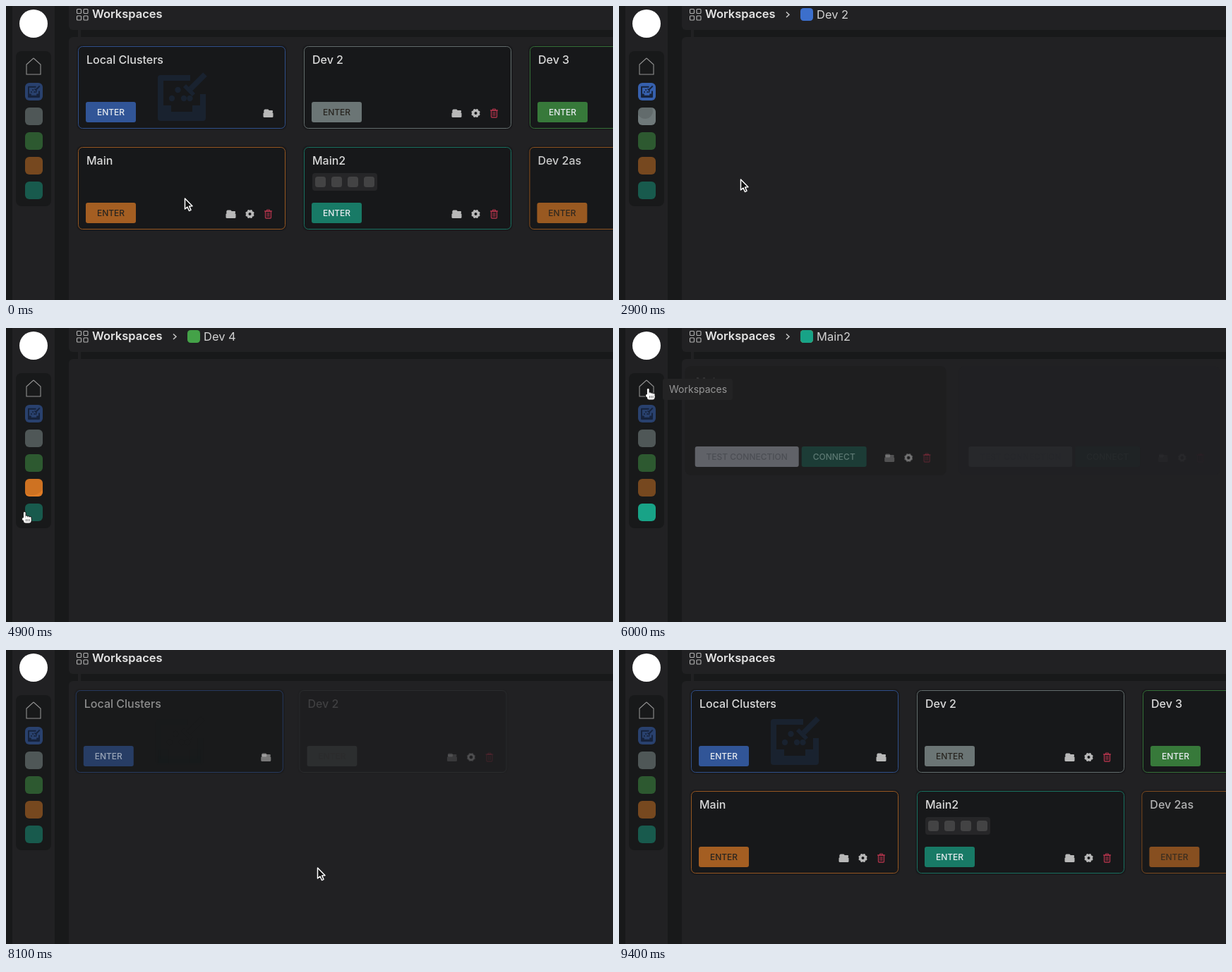
An HTML page with a canvas for the animation above (9500 ms loop, 860 by 417 pixels).

```html
<!DOCTYPE html>
<html lang="en">
<head>
<meta charset="utf-8">
<title>Workspaces</title>
<style>
html, body { margin: 0; width: 100%; height: 100%; overflow: hidden; background: #18191a; }
canvas { display: block; }
</style>
</head>
<body>
<canvas id="stage" width="860" height="417"></canvas>
<script>
const ctx = document.getElementById('stage').getContext('2d');
const LOOP = 9500, STEP = 100, HOME = -1;
const DARK = '#18191a', PAGE = '#212123', GREY = '#b8b8b8', LIGHT = '#dadada';

const hues = { blue: '#3c6fcc', grey: '#8e9c9c', green: '#44a248', orange: '#e07c25', teal: '#18a387' };
const sideHues = Object.values(hues);
const crumbNames = ['Local Clusters', 'Dev 2', 'Dev 3', 'Dev 4', 'Main2'];
const cardNames = ['Local Clusters', 'Dev 2', 'Dev 3', 'Main', 'Main2', 'Dev 2as'];
const cardHues = [...sideHues, hues.orange];
const connections = ['Main', 'Dev 2', 'Dev 4'];

// Each click opens the next workspace; the last one returns home.
const clicks = [1200, 2800, 3750, 4700, 5350, 7300];
const pageOf = k => k === clicks.length - 1 ? HOME : k;
const iconY = i => i === HOME ? 85 : 109 + 35 * i;

const stops = [
  { t: 0, x: 253, y: 272 },
  { t: 2900, x: 172, y: 245 },
  { t: 4900, x: 22, y: 260 },
  { t: 5850, x: 37, y: 85 },
  { t: 7600, x: 441, y: 308 },
  { t: 8150, x: 441, y: 308 },
  { t: 8800, x: 130, y: 21 },
  { t: 9200, x: 84, y: -30 },
  { t: LOOP, x: 84, y: -30 }
];
clicks.forEach((c, k) => {
  for (const t of [c - 200, c]) stops.push({ t, x: 36, y: iconY(pageOf(k)) });
});
stops.sort((a, b) => a.t - b.t);

const clamp = v => Math.max(0, Math.min(1, v));
const ramp = (t, start, span) => clamp((t - start) / span);
const smooth = p => p * p * (3 - 2 * p);
const lerp = (a, b, p) => a + (b - a) * p;
const channels = hex => [1, 3, 5].map(i => parseInt(hex.slice(i, i + 2), 16));

// Hue laid over the dark base with the given strength.
function tone(hue, strength) {
  const base = channels(DARK);
  return channels(hue).map((v, i) => Math.round(lerp(base[i], v, strength)));
}
const css = rgb => `rgb(${rgb})`;
const luma = ([r, g, b]) => .3 * r + .59 * g + .11 * b;

function withAlpha(a, draw) {
  if (a <= 0) return;
  ctx.save();
  ctx.globalAlpha *= a;
  draw();
  ctx.restore();
}
function at(x, y, draw) {
  ctx.save();
  ctx.translate(x, y);
  draw();
  ctx.restore();
}
function box(x, y, w, h, r, fill) {
  ctx.beginPath();
  ctx.roundRect(x, y, w, h, r);
  ctx.fillStyle = fill;
  ctx.fill();
}
function outline(x, y, w, h, r, color, width = 1) {
  ctx.beginPath();
  ctx.roundRect(x, y, w, h, r);
  ctx.strokeStyle = color;
  ctx.lineWidth = width;
  ctx.stroke();
}
function line(color, width, ...points) {
  ctx.beginPath();
  points.forEach(p => ctx.lineTo(...p));
  ctx.strokeStyle = color;
  ctx.lineWidth = width;
  ctx.stroke();
}
function dot(x, y, r, fill) {
  ctx.beginPath();
  ctx.arc(x, y, r, 0, 7);
  ctx.fillStyle = fill;
  ctx.fill();
}
function text(s, x, y, size, weight, color, align = 'left') {
  ctx.font = `${weight} ${size}px Inter, sans-serif`;
  ctx.textAlign = align;
  ctx.fillStyle = color;
  ctx.fillText(s, x, y);
}
function button(label, x, y, w, fill, ink) {
  box(x, y, w, 29, 3, fill);
  text(label, x + w / 2, y + 19, 12, 500, ink, 'center');
}

function folder(x, y) {
  box(x - 6, y - 5.5, 7, 5, 1.5, GREY);
  box(x - 6, y - 4, 12.5, 3, 1, GREY);
  box(x - 7, y - 1, 14, 7, 1.5, GREY);
}
function gear(x, y) {
  for (let i = 0; i < 8; i++) {
    const a = (i + .5) * Math.PI / 4;
    dot(x + 4.4 * Math.cos(a), y + 4.4 * Math.sin(a), 1.9, GREY);
  }
  outline(x - 3.5, y - 3.5, 7, 7, 3.5, GREY, 3);
}
function trash(x, y) {
  const red = '#ac3349';
  outline(x - 2, y - 6, 4, 2, 0, red);
  outline(x - 4, y - 4, 8, 10, 1, red, 1.3);
  line(red, 1.4, [x - 5.5, y - 4], [x + 5.5, y - 4]);
  for (const dx of [-1.6, 0, 1.6]) line(red, .8, [x + dx, y - 2], [x + dx, y + 4]);
}
function tools(x, y, onlyFolder) {
  folder(onlyFolder ? x + 53 : x, y);
  if (onlyFolder) return;
  gear(x + 27, y);
  trash(x + 53, y);
}
// Tray with dots and a pen in a 68 unit square.
function clusterIcon(x, y, scale, color) {
  at(x, y, () => {
    ctx.scale(scale, scale);
    ctx.lineJoin = 'round';
    line(color, 8, [46, 7], [4, 7], [4, 64], [64, 64], [64, 30]);
    box(4, 46, 15, 20, 0, color);
    box(49, 46, 15, 20, 0, color);
    box(4, 55, 60, 10, 0, color);
    line(color, 8, [67, 2], [46, 23]);
    line(color, 6, [38, 18], [51, 31]);
    for (let i = 0; i < 4; i++) dot(20 + 8.5 * i, i === 1 ? 24 : 36, 4.2, color);
  });
}

function frameParts() {
  box(0, 0, 860, 417, 0, DARK);
  box(9, 0, 60, 417, 0, PAGE);
  box(14, 64, 50, 220, 8, DARK);
  box(89, -10, 780, 44, 6, PAGE);
  box(102, 34, 4, 10, 0, PAGE);
}

function sidebar(current, previous, since) {
  dot(39, 25, 20, '#fff');
  ctx.lineJoin = 'miter';
  line('#929292', 1.1, [39, 74], [29, 83], [29, 97], [49, 97], [49, 83], [39, 74]);
  sideHues.forEach((hue, i) => {
    const y = iconY(i);
    const lit = i === current ? ramp(since, 0, 200) : i === previous ? 1 - ramp(since, 50, 150) : 0;
    box(27, y, 25, 25, 6, css(tone(hue, lerp(.47, 1, lit))));
    if (i === current) withAlpha(.14 * (1 - ramp(since, 0, 500)), () => {
      ctx.beginPath();
      ctx.roundRect(27, y, 25, 25, 6);
      ctx.clip();
      dot(37, y + 5, 4 + since * .07, '#000');
    });
    if (!i) clusterIcon(31, y + 4, .25, '#16233c');
  });
}

function breadcrumb(current, previous, since) {
  for (const x of [100.5, 110]) for (const y of [4.5, 14]) outline(x, y, 6, 6, 1, '#b4b4b4', 1.1);
  text('Workspaces', 122, 17, 16.5, 600, '#e4e4e4');
  if (current === HOME) return;
  line('#c8c8c8', 1.5, [237, 8.5], [241, 12.3], [237, 16]);
  box(257, 3, 18, 18, 4.5, sideHues[previous === HOME ? current : previous]);
  withAlpha(ramp(since, 220, 200), () => box(257, 3, 18, 18, 4.5, sideHues[current]));
  text(crumbNames[current], 280, 18, 16.5, 400, '#d2d2d2');
}

// Cards fade in one after another while sliding right.
function dealCards(names, t, first, gap, span, place, draw) {
  names.forEach((name, i) => {
    const start = first + gap * i;
    const a = smooth(ramp(t, start, span));
    const [x, y] = place(i);
    const extras = ramp(t, start + span * .55, 300);
    withAlpha(a, () => at(x - 8 * (1 - a), y, () => draw(name, i, extras, a)));
  });
}

function homeCard(name, i, extras) {
  const fill = tone(cardHues[i], .7);
  box(-2, -2, 298, 121, 8, 'rgba(16,17,18,.35)');
  box(0, 0, 294, 117, 6, '#17181a');
  outline(.5, .5, 293, 116, 6, css(tone(cardHues[i], .63)));
  if (name === 'Local Clusters') withAlpha(extras, () => clusterIcon(113, 38, 1, '#19222f'));
  text(name, 12, 25, 16, 500, LIGHT);
  if (name === 'Main2') withAlpha(extras, () => {
    box(12, 37, 92, 25, 4, '#262628');
    for (let k = 0; k < 4; k++) box(16 + 23 * k, 42, 15, 15, 3.5, '#434344');
  });
  button('ENTER', 11, 79, 71, css(fill), luma(fill) > 100 ? '#27241f' : '#e8ecf0');
  tools(216.5, 95, i === 0);
}
function homePage(t) {
  const clock = t < clicks[0] ? t + LOOP : t;
  if (clock < 7900) return;
  dealCards(cardNames, clock, 7647, 237, 800, i => [102 + 320 * (i % 3), i < 3 ? 57 : 200], homeCard);
}

function chip(label, x, y, labelWidth, width, value) {
  const split = x + labelWidth;
  box(x, y, width, 26, 4, '#262628');
  box(x, y, labelWidth, 26, [4, 0, 0, 4], '#39393b');
  line('#262628', 2, [split, y + 9], [split - 3, y + 13], [split, y + 17]);
  text(label, x + 5, y + 17, 12, 600, '#c6c6c6');
  if (value) text(value, split + 4, y + 17, 11, 400, '#b2b2b2');
  else box(split + 4, y + 5.5, width - labelWidth - 14, 15, 5, '#38383a');
}
function connectionCard(name, i, extras, a) {
  box(0, 0, 370, 155, 8, DARK);
  withAlpha(a, () => text(name, 15, 28, 16, 500, LIGHT));
  withAlpha(extras, () => {
    chip('Host', 15, 39, 39, 151, '192.168.1.190:9042');
    chip('Cassandra', 173, 39, 72, 117);
    chip('Data Center', 15, 71, 80, 135);
  });
  button('TEST CONNECTION', 14, 114, 147, '#e2e8f5', '#23262b');
  button('CONNECT', 165, 114, 92, css(tone(hues.teal, .68)), '#dcefea');
  tools(289.5, 130);
}
function clusterPage(t) {
  dealCards(connections, t, 5649, 250, 900, i => [99 + 390 * (i % 2), i < 2 ? 54 : 229], connectionCard);
}

function tooltip(t) {
  if (t < 5900 || t >= 7400) return;
  box(62, 72, 99, 30, 3, '#232324');
  withAlpha(.4 + .6 * ramp(t, 5850, 400), () => text('Workspaces', 71, 92, 14, 400, '#dcdcdc'));
}

function hand() {
  // The dark pass makes the outline around the white pass.
  for (const [grow, fill] of [[1, '#222'], [0, '#fff']]) {
    const part = (x, y, w, h, r) => box(x - grow, y - grow, w + 2 * grow, h + 2 * grow, r + grow, fill);
    part(3, 1, 2.6, 12, 1.3);
    part(1, 9, 4, 4, 2);
    for (let i = 0; i < 3; i++) part(5.5 + 2.7 * i, 6.5 + i * .7, 2.6, 6, 1.3);
    part(3, 9.5, 10.5, 7, 3);
  }
  for (let i = 0; i < 3; i++) line('#444', .8, [6.5 + 2.3 * i, 11], [6.5 + 2.3 * i, 14.5]);
}
function arrow() {
  ctx.beginPath();
  ctx.moveTo(.5, 1);
  ctx.lineTo(.5, 16);
  ctx.lineTo(4, 13);
  ctx.lineTo(6.5, 18.5);
  ctx.lineTo(9, 17.4);
  ctx.lineTo(6.7, 12);
  ctx.lineTo(11, 11.7);
  ctx.closePath();
  ctx.lineJoin = 'round';
  ctx.fillStyle = '#111';
  ctx.fill();
  ctx.strokeStyle = '#fff';
  ctx.lineWidth = 1.5;
  ctx.stroke();
}
function pointer(t) {
  const next = stops.findIndex(s => s.t > t);
  const a = stops[next - 1], b = stops[next];
  const p = smooth(ramp(t, a.t, b.t - a.t));
  const x = lerp(a.x, b.x, p), y = lerp(a.y, b.y, p);
  at(x, y, x < 56 ? hand : arrow);
}

function render(t) {
  const n = clicks.length;
  const k = (clicks.filter(c => c <= t).length + n - 1) % n;
  const current = pageOf(k), previous = pageOf((k + n - 1) % n);
  const since = (t - clicks[k] + LOOP) % LOOP;

  frameParts();
  sidebar(current, previous, since);
  breadcrumb(current, previous, since);
  withAlpha(current === HOME ? 1 : .5 + .5 * ramp(since, 0, 100), () => box(89, 44, 780, 390, 6, PAGE));
  if (current === HOME) homePage(t);
  if (current === 4) clusterPage(t);
  tooltip(t);
  pointer(t);
}

function tick(now) {
  render(Math.floor(now % LOOP / STEP) * STEP);
  requestAnimationFrame(tick);
}
tick(performance.now());
</script>
</body>
</html>
```
